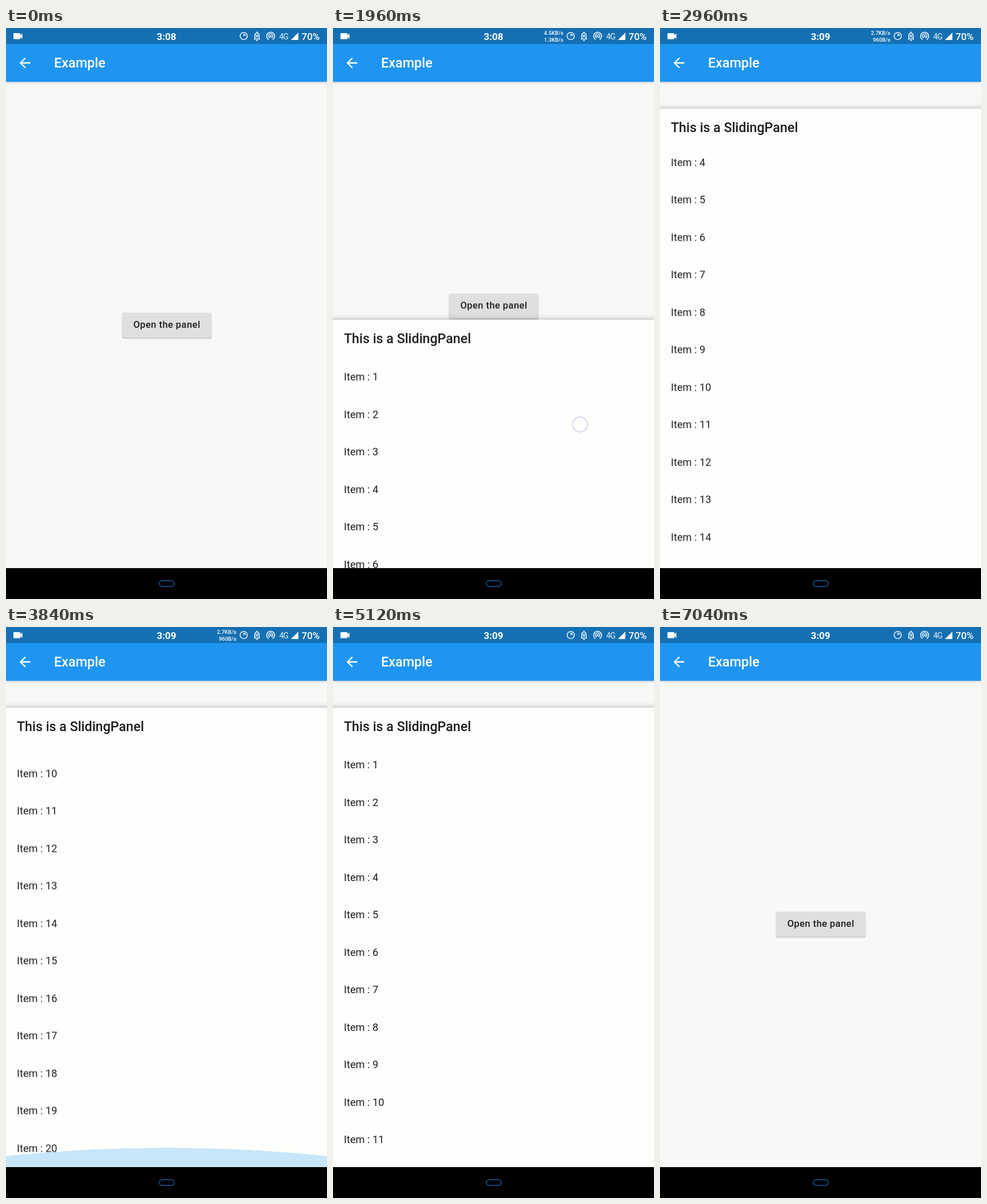
An HTML page that plays this animation: 561 by 998 pixels, repeating every 7.08 s.

```html
<!DOCTYPE html>
<html lang="en">
<head>
<meta charset="utf-8">
<title>Sliding panel</title>
<style>
html, body { margin: 0; width: 100%; height: 100%; overflow: hidden; background: #f7f9f7; }
body { position: relative; font-family: Roboto, sans-serif; color: #1d1e1d; }
div { position: absolute; white-space: nowrap; }
.anim { animation: 7080ms linear infinite; }

.button {
  left: 203px; top: 498px; width: 156px; height: 43px;
  background: #dde0dd; border-radius: 2px;
  box-shadow: 0 2px 2px rgba(0,0,0,.18), 0 0 2px rgba(0,0,0,.14);
  font-size: 16.6px; font-weight: 500; letter-spacing: .4px; line-height: 42px; text-align: center;
  animation-name: body;
}
.panel {
  left: 0; top: 944px; width: 561px; height: 803px; background: #fdfffc;
  animation-name: panel;
}
.shade {
  left: 0; top: -11px; width: 561px; height: 11px;
  background: linear-gradient(transparent, rgba(0,0,0,.04) 55%, rgba(0,0,0,.16));
  animation-name: shade;
}
.heading { left: 19px; top: 0; line-height: 66px; font-size: 23.2px; font-weight: 500; }
.view { left: 0; top: 67px; width: 561px; height: 736px; overflow: hidden; }
.list { left: 19px; top: 0; animation-name: list; }
.list p { margin: 0; height: 65.5px; line-height: 66.5px; font-size: 18.2px; }
.glow {
  left: 0; top: 831px; width: 561px; height: 113px; overflow: hidden;
  transform-origin: bottom; animation-name: glow;
}
.glow div { left: -561px; top: 0; width: 1683px; height: 1683px; border-radius: 50%; background: rgba(33,150,243,.24); }
.dot {
  left: -14px; top: -14px; width: 24px; height: 24px; border: 2px solid #d9d8e9; border-radius: 50%;
  background: rgba(255,255,255,.6); animation-name: move, touch; animation-timing-function: linear, step-end;
}
.appbar {
  left: 0; top: 28px; width: 561px; height: 65.5px; background: #1f95f1;
  box-shadow: 0 1px 4px rgba(0,0,0,.24);
}
.appbar div { left: 84px; line-height: 66px; font-size: 23.4px; font-weight: 500; color: #fff; }
.nav { left: 0; top: 944px; width: 561px; height: 54px; background: #000; }
.nav div { left: 267px; top: 21px; width: 24px; height: 8px; border: 2px solid #14467c; border-radius: 6px; }
svg { position: absolute; left: 0; top: 0; fill: #fff; }
.bar { font-size: 17px; font-weight: 700; }
.speed { font-size: 9.4px; font-weight: 500; text-anchor: end; }
.line { fill: none; stroke: #e8f1f8; stroke-width: 1.6; stroke-linecap: round; }
.step { animation-timing-function: step-end; }
.before { animation-name: before; }
.after { animation-name: after; }
.fast { animation-name: fast; }
.slow { animation-name: slow; }

@keyframes panel {
  0%, 12.43% { transform: translateY(0); animation-timing-function: cubic-bezier(.2,.6,.3,1); }
  19.21%, 27.12% { transform: translateY(-425px); }
  27.68% { transform: translateY(-433px); }
  31.64% { transform: translateY(-690px); animation-timing-function: ease-out; }
  34.46%, 78.53% { transform: translateY(-803px); }
  82.49% { transform: translateY(-562px); }
  85.31% { transform: translateY(-380px); animation-timing-function: ease-out; }
  90.4%, 100% { transform: translateY(0); }
}
/* Same timing as the panel, at a fraction of its travel */
@keyframes body {
  0%, 12.43% { transform: translateY(0); animation-timing-function: cubic-bezier(.2,.6,.3,1); }
  19.21%, 27.12% { transform: translateY(-32.9px); }
  27.68% { transform: translateY(-33.5px); }
  31.64% { transform: translateY(-53.4px); animation-timing-function: ease-out; }
  34.46%, 78.53% { transform: translateY(-62.2px); }
  82.49% { transform: translateY(-43.5px); }
  85.31% { transform: translateY(-29.4px); animation-timing-function: ease-out; }
  90.4%, 100% { transform: translateY(0); }
}
@keyframes shade {
  0%, 12.43% { opacity: 0; }
  13%, 89.5% { opacity: 1; }
  90.4%, 100% { opacity: 0; }
}
@keyframes list {
  0%, 37.85% { transform: translateY(0); }
  40.68% { transform: translateY(-132px); }
  41.81% { transform: translateY(-202px); animation-timing-function: cubic-bezier(.3,.53,.7,.95); }
  52.54%, 58.76% { transform: translateY(-574.5px); }
  61.02% { transform: translateY(-450px); }
  63.28% { transform: translateY(-269px); animation-timing-function: cubic-bezier(.3,.6,.65,1); }
  70.06%, 100% { transform: translateY(0); }
}
@keyframes glow {
  0%, 52.54% { transform: scaleY(0); opacity: 0; }
  54.24% { transform: scaleY(.297); opacity: 1; }
  54.8% { transform: scaleY(.3); opacity: 1; }
  62.71%, 100% { transform: scaleY(0); opacity: 0; }
}
@keyframes move {
  0%, 12.43% { transform: translate(300px, 522px); }
  25.42% { transform: translate(432px, 723px); }
  27.12% { transform: translate(432px, 702px); }
  27.68% { transform: translate(432px, 694px); }
  31.64% { transform: translate(432px, 437px); }
  36.72% { transform: translate(432px, 650px); }
  37.85% { transform: translate(432px, 629px); }
  40.68% { transform: translate(432px, 497px); }
  57.63% { transform: translate(420px, 480px); }
  58.76% { transform: translate(420px, 501px); }
  61.02% { transform: translate(420px, 625px); }
  77.12% { transform: translate(406px, 454px); }
  78.53% { transform: translate(406px, 475px); }
  82.49% { transform: translate(406px, 716px); }
  85.31%, 100% { transform: translate(406px, 898px); }
}
@keyframes touch {
  0%, 12.43%, 31.64%, 40.68%, 61.02%, 85.31%, 100% { opacity: 0; }
  10.73%, 25.42%, 36.72%, 57.63%, 77.12% { opacity: 1; }
}
@keyframes before { 0% { opacity: 1; } 36.72%, 100% { opacity: 0; } }
@keyframes after { 0% { opacity: 0; } 36.72%, 100% { opacity: 1; } }
@keyframes fast { 0%, 36.72%, 100% { opacity: 0; } 5.65% { opacity: 1; } }
@keyframes slow { 0%, 67.8%, 100% { opacity: 0; } 36.72% { opacity: 1; } }
</style>
</head>
<body>
<div class="button anim">Open the panel</div>
<div class="panel anim">
  <div class="shade anim"></div>
  <div class="heading">This is a SlidingPanel</div>
  <div class="view"><div class="list anim" id="list"></div></div>
</div>
<div class="glow anim"><div></div></div>
<div class="dot anim"></div>
<div class="appbar"><div>Example</div></div>
<div class="nav"><div></div></div>

<svg width="561" height="94" viewBox="0 0 561 94">
  <path fill="#1570b3" d="M0 0h561v28H0z"/>
  <path transform="translate(19 47) scale(1.17)" d="M20 11H7.83l5.59-5.59L12 4l-8 8 8 8 1.41-1.41L7.83 13H20v-2z"/>
  <path transform="translate(10.4 3.9) scale(.87)" d="M17 10.5V7c0-.55-.45-1-1-1H4c-.55 0-1 .45-1 1v10c0 .55.45 1 1 1h12c.55 0 1-.45 1-1v-3.5l4 4v-11l-4 4z"/>
  <g class="bar">
    <text class="anim step before" x="263.5" y="20.5">3:08</text>
    <text class="anim step after" x="263.5" y="20.5">3:09</text>
    <text x="516.5" y="20.5" font-weight="500">70%</text>
  </g>
  <g class="speed">
    <g class="anim step fast"><text x="402.5" y="12">4.5KB/s</text><text x="402.5" y="23.5">1.3KB/s</text></g>
    <g class="anim step slow"><text x="402.5" y="12">2.7KB/s</text><text x="402.5" y="23.5">960B/s</text></g>
  </g>
  <g class="line">
    <circle cx="415.5" cy="14" r="6.3"/>
    <path stroke-width="1.3" d="M415 13.8l2.6-2.2M415 10.6q3 0 3.8 3"/>
    <path d="M433.8 19.2h9.6M434.7 19v-5.8a3.9 4.6 0 0 1 7.8 0V19M438.6 6.8v1.5M437.4 21.6h2.4M436.9 12.2l3.4 3.7M440.3 12.2l-3.4 3.7"/>
    <path d="M458.4 20a7 7 0 1 1 8.2 0M460.3 17.2a3.8 3.8 0 1 1 4.4 0"/>
  </g>
  <circle cx="462.5" cy="14.5" r="1.8"/>
  <text x="477.5" y="19.5" font-size="14" letter-spacing="-.9" fill="#e3eef7">4G</text>
  <path d="M511 8v13h-13z"/>
</svg>

<script>
const list = document.getElementById('list');
for (let i = 1; i <= 20; i++) {
  const row = document.createElement('p');
  row.textContent = `Item : ${i}`;
  list.append(row);
}
</script>
</body>
</html>
```
